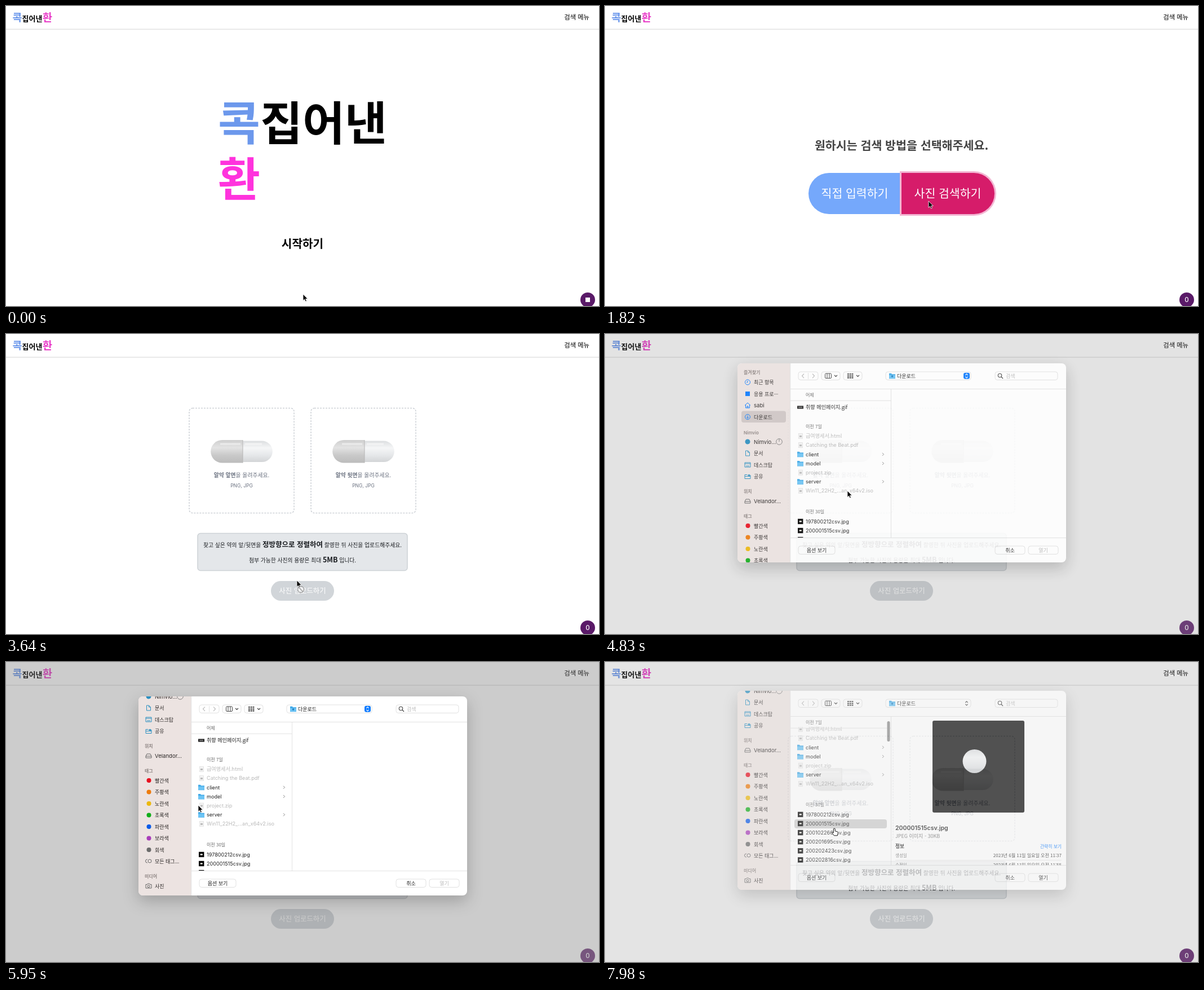
Recreate the animation shown at these times as an HTML page. Size 1052 by 532 pixels, loop 8000 ms.

```html
<!DOCTYPE html>
<html lang="ko">
<head>
<meta charset="utf-8">
<title>약 사진 검색</title>
<style>
html, body { margin: 0; width: 100%; height: 100%; overflow: hidden; background: #fff; }
svg { display: block; }
text { white-space: pre; font-family: "Noto Sans CJK KR", "Noto Sans CJK JP", sans-serif; }
text.latin { font-family: Inter, Roboto, sans-serif; }
</style>
</head>
<body>
<svg id="stage" width="1052" height="532" viewBox="0 0 1052 532"></svg>
<script>
const BLUE = '#6c98ec', PINK = '#ff33dd', ROSE = '#d61c6a', GRAY = '#6b7280', MAC = '#0a7aff';
const BRAND = ['콕', '집어낸', '환'];

const text = (x, y, s, size, fill = '#000', weight = 400, anchor = 'start') =>
  `<text x="${x}" y="${y}" font-size="${size}" fill="${fill}" font-weight="${weight}" text-anchor="${anchor}"${
    /[가-힣]/.test(s) ? '' : ' class="latin"'}>${s}</text>`;
const mid = (x, y, s, size, fill, weight) => text(x, y, s, size, fill, weight, 'middle');
const span = (s, attrs) => `<tspan ${attrs}>${s}</tspan>`;
const bold = s => span(s, 'font-weight="700" fill="#000"');
const rect = (x, y, w, h, fill, r = 0, more = '') =>
  `<rect x="${x}" y="${y}" width="${w}" height="${h}" rx="${r}" fill="${fill}" ${more}/>`;
const circle = (x, y, r, fill, more = '') => `<circle cx="${x}" cy="${y}" r="${r}" fill="${fill}" ${more}/>`;
const line = (d, color, width = 1, more = '') =>
  `<path d="${d}" fill="none" stroke="${color}" stroke-width="${width}" ${more}/>`;
const group = (id, body, more = '') => `<g id="${id}" ${more}>${body}</g>`;
const clip = (id, x, y, w, h, r = 0) => `<clipPath id="${id}">${rect(x, y, w, h, '#000', r)}</clipPath>`;
const gradient = (id, ...colors) => `<linearGradient id="${id}" x2="0" y2="1">${
  colors.map((c, i) => `<stop offset="${i / (colors.length - 1)}" stop-color="${c}"/>`).join('')}</linearGradient>`;

const defs = `<defs>
  ${clip('frame', 235, 61, 583, 353, 8)}${clip('side', 235, 61, 94, 353)}
  ${clip('list', 329, 125, 178, 245)}${clip('info', 508, 107, 310, 263)}
  ${gradient('pillA', '#cfcfcf', '#e3e3e3', '#c9c9c9', '#bcbcbc')}
  ${gradient('pillB', '#dcdee0', '#f5f6f7', '#e6e8ea', '#d3d5d7')}
  ${gradient('photo', '#c9c5c3', '#b1b1b0', '#9c9d9e', '#8d8e8d')}
</defs>`;

const header = rect(0, 0, 1052, 41, '#fff') + rect(0, 40.5, 1052, 1.5, '#e3e3e3') +
  text(11.5, 26.5, BRAND[0], 18.5, BLUE, 700) + text(28.5, 26.5, BRAND[1], 13, '#000', 700) +
  text(65, 26.5, BRAND[2], 18.5, '#e83cc8', 700) + text(1035, 24, '검색 메뉴', 11.3, '#000', 500, 'end');

const hero = text(376, 238, span(BRAND[0], `fill="${BLUE}"`) + BRAND[1], 81.5, '#000', 700) +
  text(376, 337, BRAND[2], 81.5, PINK, 700) + mid(526, 429, '시작하기', 20.2, '#000', 700);

const choose = mid(526, 255, '원하시는 검색 방법을 선택해주세요.', 20.6, '#444', 700) +
  `<path d="M524 296H397.5a36.5 36.5 0 0 0 0 73H524z" fill="#75a8fb"/>` +
  `<path id="ring" d="M523 293H654.5a39.5 39.5 0 0 1 0 79H523z" fill="#f3b5d2"/>` +
  `<path d="M526 296H654.5a36.5 36.5 0 0 1 0 73H526z" fill="${ROSE}"/>` +
  mid(443, 340, '직접 입력하기', 20.5, '#fff', 500) + mid(608, 340, '사진 검색하기', 20.5, '#fff', 500);

function dropBox(x, side) {
  const c = x + 93;
  return rect(x, 131.5, 186, 186, '#fff', 6, 'stroke="#cdd1d6" stroke-width="1.5" stroke-dasharray="3 2"') +
    `<path d="M${c + 2} 188h-36.5a20.3 20.3 0 0 0 0 40.6h36.5z" fill="url(#pillA)"/>` +
    `<path d="M${c + 2} 189.5h34a18.7 18.7 0 0 1 0 37.6h-34z" fill="url(#pillB)"/>` +
    line(`M${c + 2} 188v40.5`, '#b5b5b5') + line(`M${c - 38} 195h36m8 0h30`, '#fff', 3, 'opacity=".45"') +
    mid(c, 254, span('알약 ' + side, 'font-weight="700"') + '을 올려주세요.', 9.8, GRAY) +
    mid(c, 272.3, 'PNG, JPG', 8.5, GRAY);
}
const big = s => span(s, 'font-size="12.5" font-weight="600"');
const upload = dropBox(325, '앞면') + dropBox(541, '뒷면') +
  rect(340, 353.5, 372, 66, '#e4e7ea', 5, 'stroke="#cdd2d6" stroke-width="1.5"') +
  mid(526, 378, `찾고 싶은 약의 앞/뒷면을 ${big('정방향으로 정렬하여')} 촬영한 뒤 사진을 업로드해주세요.`, 9.8, '#1a1d21') +
  mid(526, 404.5, `첨부 가능한 사진의 용량은 최대 ${big('5MB')} 입니다.`, 9.8, '#1a1d21') +
  rect(470, 438, 112, 35, '#d1d5d9', 17.5) + mid(526, 460, '사진 업로드하기', 12.4, '#fff', 500);

const phone = rect(611, 128.5, 131, 288, '#000') + rect(611, 171, 131, 178, 'url(#photo)') +
  rect(611, 332, 131, 17, '#3e3c37', 0, 'opacity=".8"') +
  line('M653.5 171v178M698 171v178M611 230h131M611 293.5h131', '#fff', .8, 'opacity=".5"') +
  rect(611.7, 200.3, 129.6, 131.5, 'none', 0, 'stroke="#f3e94c" stroke-width="1.3" stroke-dasharray="4 2.5"') +
  rect(668, 264, 24, 14, '#666', 7, 'opacity=".55"') + rect(664, 260, 23.5, 13, '#e6e6e6', 6.5) +
  [618, 630.5, 733.5].map(x => circle(x, 148, 3.8, 'none', 'stroke="#eee" stroke-width=".9"') + circle(x, 148, 1.4, '#eee')).join('') +
  circle(676, 148, 5, '#222') + line('M673.8 149l2.2-2 2.2 2', '#fff', .9) + circle(710, 131.5, .9, '#c56') +
  circle(668, 338, 5, '#333') + circle(683, 338, 6, '#333') +
  mid(668, 339.7, '0.6', 4.5, '#fff', 600) + mid(683, 339.7, '1×', 4.5, '#fff', 600) +
  [[631, '시네마틱'], [655, '비디오'], [676, '사진'], [699, '인물 사진'], [725, '파노라마']]
    .map(([x, s]) => mid(x, 359, s, 5.2, s == '사진' ? '#f5d84a' : '#ddd', 600)).join('') +
  rect(616, 369, 18, 18, '#99948d', 1) + circle(676, 377.5, 12, '#000', 'stroke="#fff" stroke-width="1.6"') +
  circle(676, 377.5, 10, '#fff') + circle(726.5, 377.5, 8, '#222') +
  circle(726.5, 377.5, 3.5, 'none', 'stroke="#eee" stroke-dasharray="8 3"') + rect(652, 412, 48, 1.8, '#fff', 1);

const modal = rect(0, 0, 1052, 532, '#000', 0, 'opacity=".5"') + rect(281, 81, 490.5, 395, '#fff', 5) +
  line('M281 128.2h490M281 416.8h490', '#e5e7eb') +
  circle(299.5, 101, 4.2, '#f7e6a2', 'stroke="#dcc67c" stroke-width=".7"') + rect(297.6, 105, 3.8, 5, '#a9a9a9', 1) +
  text(307, 108, '사진 업로드 시 유의사항', 13.8, '#111', 600) +
  line('M744 100.5l8 8m0-8l-8 8', '#888', 1.3) +
  mid(454, 231, bold('충분한 조명이 있는 깨끗한 배경에서 초점에 맞게 촬영해 주세요.'), 11.15) +
  mid(454, 262, bold('정방향(1:1)') + '에 맞추어 촬영해 주세요.', 11.15, GRAY) +
  mid(454, 292.3, '알약이 ' + bold('격자 가운데') + '에 위치하도록 촬영해 주세요.', 11.15, GRAY) +
  mid(454, 323, '사진에 ' + bold('그림자가 지지 않도록') + ' 주의해 주세요.', 11.15, GRAY) +
  phone + rect(475, 429, 102, 35, ROSE, 17.5, 'id="agree"') + mid(526, 451, '이해했습니다.', 12.4, '#fff', 600);

// Icons are drawn around the centre (0, 0).
const icons = {
  clock: circle(0, 0, 4.5, 'none') + line('M0-2.5V0h-2', 'inherit'),
  app: rect(-4, -4, 8, 8, MAC, 0, 'stroke="none"'),
  home: '<path d="M-5 0l5-4.5L5 0M-3.5-1v5.5h7V-1M-1 4.5v-3h2v3"/>',
  down: circle(0, 0, 4.5, 'none') + '<path d="M0-2.5v5M-2 .5l2 2 2-2"/>',
  cloud: circle(0, 0, 4.5, '#2a8fc0', 'stroke="none"'),
  doc: '<path d="M-3.5-4.5h4l3 3v6h-7zM.5-4.5v3h3"/>',
  desk: '<path d="M-5-4H5v8H-5zM-5-2H5M-3 2h6"/>',
  share: '<path d="M-5 4v-7h4l1 1h5v6zM-5 0H5"/>' + circle(2.5, -2, 1.2, '#2a8fc0'),
  disk: '<path d="M-5 1l2-4h6l2 4v3H-5zM-5 1H5"/>',
  tags: '<path d="M-2-3h-.5a3 3 0 0 0 0 6H-2"/>' + circle(2, 0, 3, 'none'),
  photo: '<path d="M-5-2.5h2.5l1-1.5h3l1 1.5H5v6.5H-5z"/>' + circle(0, .7, 2, 'none'),
};
const icon = (name, x, y, color) =>
  `<g transform="translate(${x} ${y})" fill="none" stroke="${color}" stroke-width="1">${
    icons[name].replaceAll('"inherit"', `"${color}"`)}</g>`;

const sideHead = (y, s) => text(246, y + 3, s, 8, '#8d8482', 600);
const sideItem = (y, name, s, color) =>
  icon(name, 253, y, color) + text(264, y + 3.5, s, /[가-힣]/.test(s) ? 9 : 9.6, '#2b2726');
const tags = [['#e8101f', '빨간색'], ['#ee7b0d', '주황색'], ['#ecb80e', '노란색'], ['#12ad1a', '초록색'],
  ['#0b5be8', '파란색'], ['#a83dba', '보라색'], ['#6b6b6b', '회색']];
const TEAL = '#2a8fc0', DIM = '#666';
const sidebar = sideHead(77, '즐겨찾기') + rect(242, 145.5, 79, 20.5, '#cfc7c5', 4) +
  sideItem(94.5, 'clock', '최근 항목', MAC) + sideItem(115, 'app', '응용 프로···', MAC) +
  sideItem(135.5, 'home', 'sabi', MAC) + sideItem(156, 'down', '다운로드', MAC) +
  sideHead(184, 'Nimvio') + sideItem(200, 'cloud', 'Nimvio...', TEAL) +
  circle(309, 200, 5.3, 'none', 'stroke="#777" stroke-width=".9"') + line('M309 200v-5', '#777', .9) +
  sideItem(220.5, 'doc', '문서', TEAL) + sideItem(241, 'desk', '데스크탑', TEAL) + sideItem(261.5, 'share', '공유', TEAL) +
  sideHead(288, '위치') + sideItem(305, 'disk', 'Velandor...', DIM) + sideHead(331.5, '태그') +
  tags.map(([c, s], i) => circle(253.5, 349 + i * 20.5, 4, c) + text(264, 352.5 + i * 20.5, s, 9, '#2b2726')).join('') +
  sideItem(492, 'tags', '모든 태그...', DIM) + sideHead(519, '미디어') + sideItem(536, 'photo', '사진', DIM);

const folder = (x, y) => `<path d="M${x} ${y - 4.5}h4l1 1.5h6v8h-11z" fill="#3fa9e8"/>` + rect(x, y - 1.5, 11, 6, '#6cc4f5', 1);
function fileRow(y, name, kind) {
  const art = {
    dir: folder(341, y) + line(`M492 ${y - 2.5}l2.5 2.5-2.5 2.5`, '#888'),
    jpg: rect(342, y - 4.7, 9.4, 9.4, '#000') + rect(344.5, y - 1.3, 4.5, 2.6, '#e8e8e0', 1.3),
    gif: rect(341, y - 2.6, 11, 5.2, '#222') + rect(343, y - .5, 7, 1, '#bbb'),
    off: rect(343.5, y - 4.5, 7, 9, '#f4f4f4', 0, 'stroke="#ddd" stroke-width=".7"') + rect(345, y - 1, 4, 3, '#bbb'),
  }[kind];
  return art + text(356, y + 3.3, name, 9.1, kind == 'off' ? '#b9b9b9' : '#222');
}
const listHead = (y, s) => text(356, y + 3, s, 8, '#666', 500);
const photos = [197800212, 200001515, 200102266, 200201695, 200202423, 200202816];
const files = fileRow(139, '취향 메인페이지.gif', 'gif') + listHead(173, '이전 7일') +
  [['급여명세서.html', 'off'], ['Catching the Beat.pdf', 'off'], ['client', 'dir'], ['model', 'dir'],
    ['project.zip', 'off'], ['server', 'dir'], ['Win11_22H2_...an_x64v2.iso', 'off']]
    .map(([s, k], i) => fileRow(190 + i * 16.15, s, k)).join('') + listHead(324, '이전 30일') +
  rect(336, 350, 164, 16, '#cfcfcf', 4, 'id="picked"') +
  photos.map((n, i) => fileRow(341.4 + i * 16.1, n + 'csv.jpg', 'jpg')).join('');

const chip = (x, y, w) => rect(x, y, w, 14.5, '#fff', 4, 'stroke="#dedede" stroke-width=".9"');
const info = (y, name, date) => text(515, y, name, 7.5, '#777') + text(810, y, date, 8, '#333', 400, 'end');
const preview = rect(581, 114, 163, 163, '#0c0c0c', 3) + circle(655.5, 186, 21, 'url(#pillB)') +
  text(515, 307.5, '200001515csv.jpg', 10.6, '#222', 600) + text(515, 322, 'JPEG 이미지 - 30KB', 9, '#777') +
  text(515, 339.5, '정보', 8.6, '#222', 700) + text(810, 339.5, '간략히 보기', 7.8, MAC, 400, 'end') +
  info(356, '생성일', '2023년 6월 11일 일요일 오전 11:37') + line('M515 361.5h295', '#e2e2e2', .8) +
  info(373, '수정일', '2023년 6월 11일 일요일 오전 11:55');

const toolbar = chip(343, 76, 35) + line('M360.5 78v11', '#e2e2e2') +
  line('M353 79.5l-3.5 3.8 3.5 3.8M368 79.5l3.5 3.8-3.5 3.8', '#b5b5b5', 1.1) +
  chip(384, 76, 33) + rect(390.5, 79, 11, 8.5, 'none', 1.5, 'stroke="#444"') + line('M394 79v8.5M398 79v8.5', '#444') +
  chip(423, 76, 33) + line('M430 80h10.5M430 83.3h10.5M430 86.6h10.5', '#444', 2.2, 'stroke-dasharray="2.8 1"') +
  line('M407 82l2.5 2.5 2.5-2.5M446 82l2.5 2.5 2.5-2.5', '#444', 1.2) +
  chip(498, 76, 151) + folder(504, 83.3) + circle(509.5, 84, 1.8, '#2380c0') + text(518, 87, '다운로드', 9, '#222') +
  rect(636, 77.8, 11, 11, MAC, 3, 'id="stepBox"') + line('M639.3 82l2.2-2.2 2.2 2.2M639.3 84.7l2.2 2.2 2.2-2.2', '#fff', 1.1, 'id="stepArrows"') +
  chip(692, 76, 111) + circle(700.5, 82.5, 3.2, 'none', 'stroke="#444" stroke-width="1.1"') +
  line('M703 85l3 3', '#444', 1.2) + text(711, 86.7, '검색', 9, '#bbb');

const dialog = rect(235, 61, 583, 353, '#fff', 8, 'style="filter:drop-shadow(0 10px 14px rgba(0,0,0,.22))"') +
  `<g clip-path="url(#frame)">` + rect(235, 61, 94, 353, '#ece3e1') +
  `<g clip-path="url(#side)">${group('sideScroll', sidebar)}</g>` + toolbar +
  `<g clip-path="url(#list)">${group('listScroll', files)}</g>` +
  `<text id="sticky" x="356" y="120" font-size="8" fill="#666" font-weight="500"></text>` +
  line('M329 106.5h489M329 127.2h178M329 370.5h489M507.5 106v264M328.7 61v353', '#e2e2e2') +
  rect(500.5, 115, 5, 36, '#8c8c8c', 2.5, 'id="bar"') +
  `<g clip-path="url(#info)">${group('preview', preview)}</g>` +
  chip(343, 385, 65) + chip(692, 385, 53) + chip(751, 385, 53) +
  mid(375.5, 395.5, '옵션 보기', 9, '#222', 500) + mid(718.5, 395.5, '취소', 9, '#222', 500) +
  group('open', mid(777.5, 395.5, '열기', 9, 'inherit', 500).replace('fill="inherit"', '')) + '</g>';

const badge = circle(1032, 521, 13, '#5a1a68') + rect(1028, 517, 8, 8, '#fff', 0, 'id="mark"') +
  group('count', mid(1032, 525, '0', 11.5, '#fff', 500));

const pointer = group('arrow', `<path d="M0 0v11.5l2.6-2.4 1.8 4 2-.9-1.8-3.8h3.6z" fill="#000" stroke="#fff" stroke-width=".8"/>`) +
  group('hand', `<path d="M-1.6-.2q1.6-1.6 2.8 0v4l4.2 1.2q1.4.6 1 2.4l-1 4.4H-.6l-3.6-4.6q-.2-1.8 1.4-1.2l1.2 1z" fill="#fff" stroke="#000" stroke-width=".9"/>`) +
  group('banned', circle(7, 16, 5.5, '#fff', 'fill-opacity=".6" stroke="#999" stroke-width="1.3"') + line('M3.3 12.3l7.4 7.4', '#999', 1.3));

stage.innerHTML = defs + group('page', header) + group('hero', hero) + group('choose', choose) + group('upload', upload) +
  group('modal', modal) + group('badge', badge) + rect(0, 0, 1052, 532, '#6e6e6e', 0, 'id="dim"') +
  group('dialog', dialog) + group('pointer', pointer);

const $ = id => document.getElementById(id);
const show = (id, on) => $(id).style.display = on ? '' : 'none';
const move = (id, x, y) => $(id).setAttribute('transform', `translate(${x} ${y})`);
const within = (t, a, b) => t >= a && t < b;

// Value at time t along flat [time, value] pairs, eased between them.
function track(t, ...keys) {
  let i = 0;
  while (i + 2 < keys.length && keys[i + 2] <= t) i += 2;
  if (t <= keys[0] || i + 2 >= keys.length) return keys[i + 1];
  const p = (t - keys[i]) / (keys[i + 2] - keys[i]);
  return keys[i + 1] + (keys[i + 3] - keys[i + 1]) * p * p * (3 - 2 * p);
}

function draw(t) {
  show('hero', t < 910);
  show('choose', within(t, 910, 3500));
  show('ring', t >= 1820);
  show('modal', within(t, 1960, 3500));
  $('agree').setAttribute('fill', within(t, 3220, 3500) ? '#c2185f' : ROSE);
  show('upload', t >= 3500);
  show('mark', t < 350);
  show('count', t >= 350);

  const dim = track(t, 4550, 0, 4970, .26, 5180, .35, 7840, .35, 7980, .19);
  $('dim').setAttribute('opacity', dim);
  $('badge').setAttribute('opacity', 1 - dim * .6);
  show('dialog', t >= 4620);
  $('dialog').setAttribute('opacity', track(t, 4550, 0, 4900, 1, 7840, 1, 7980, .68));
  move('dialog', 0, track(t, 4620, -20, 4970, -3, 5250, 0, 7840, 0, 7980, -10));
  move('sideScroll', 0, -track(t, 5460, 0, 5880, 139));
  const scroll = track(t, 6370, 0, 6860, 61);
  move('listScroll', 0, -scroll);
  $('sticky').textContent = scroll > 50 ? '이전 7일' : '어제';
  show('bar', t > 6370);
  $('bar').setAttribute('y', 108 + scroll * .115);
  const picked = t >= 7560, closing = t >= 7910;
  show('picked', picked);
  show('preview', picked);
  $('open').setAttribute('fill', picked ? '#222' : '#bbb');
  show('stepBox', !closing);
  $('stepArrows').setAttribute('stroke', closing ? '#444' : '#fff');

  const hand = within(t, 560, 910) || within(t, 2450, 3500) || within(t, 4130, 4620) || closing;
  show('hand', hand);
  show('arrow', !hand);
  show('banned', within(t, 3500, 3990));
  move('pointer',
    track(t, 0, 527, 630, 536, 770, 545, 1330, 545, 1820, 574, 2030, 574, 2660, 518, 3430, 518, 3500, 516, 3850, 516,
      4270, 430, 5040, 430, 5460, 300, 5880, 300, 5950, 341, 6370, 418, 6930, 418, 7280, 407),
    track(t, 0, 511, 630, 426, 770, 424, 1330, 424, 1820, 346, 2030, 346, 2660, 441, 3430, 441, 3500, 437, 3850, 437,
      4270, 278, 5040, 278, 5460, 256, 5880, 256, 5950, 254, 6370, 330, 6930, 330, 7280, 296));
}

function tick() {
  draw(Math.floor(performance.now() % 8000 / 70) * 70);
  requestAnimationFrame(tick);
}
tick();
</script>
</body>
</html>
```
